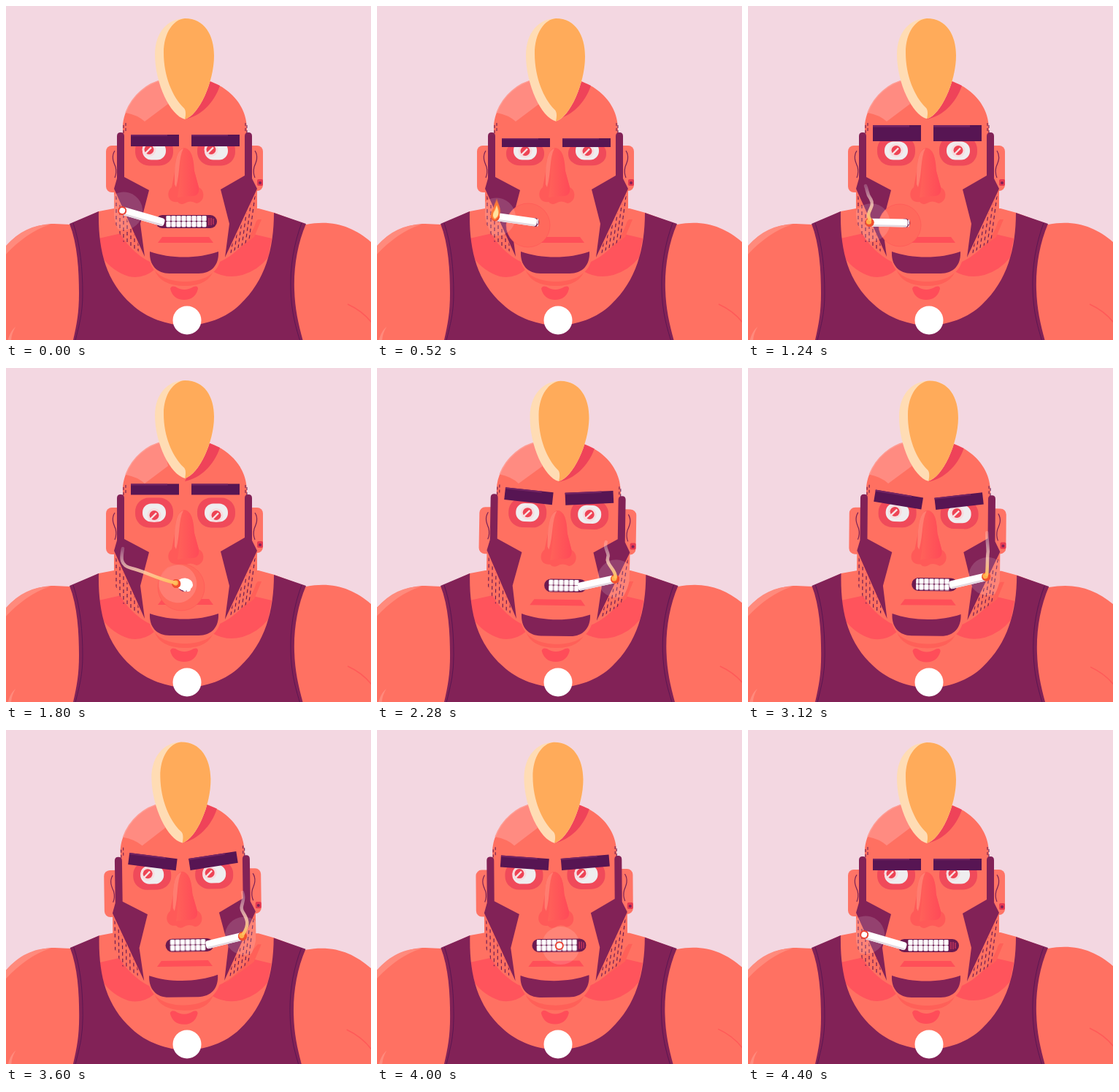
Recreate the animation shown at these times as an HTML page without scripts. Size 500 by 457 pixels, loop 4.44 s.

```html
<!DOCTYPE html>
<html lang="en">
<head>
<meta charset="utf-8">
<title>Tough guy with a cigarette</title>
<style>
@property --tilt { syntax: "<number>"; inherits: true; initial-value: 0 }
@property --drop { syntax: "<number>"; inherits: true; initial-value: 0 }
@property --sway { syntax: "<number>"; inherits: true; initial-value: 0 }
@property --swell { syntax: "<number>"; inherits: true; initial-value: 1 }
@property --slant { syntax: "<number>"; inherits: true; initial-value: 0 }
@property --hair { syntax: "<number>"; inherits: true; initial-value: 1 }
@property --brow-y { syntax: "<number>"; inherits: true; initial-value: 184 }
@property --brow-h { syntax: "<number>"; inherits: true; initial-value: 16 }
@property --brow-a { syntax: "<number>"; inherits: true; initial-value: 0 }
@property --lid { syntax: "<number>"; inherits: true; initial-value: 1 }
@property --look-x { syntax: "<number>"; inherits: true; initial-value: 0 }
@property --look-y { syntax: "<number>"; inherits: true; initial-value: 0 }
@property --mx { syntax: "<number>"; inherits: true; initial-value: 205 }
@property --my { syntax: "<number>"; inherits: true; initial-value: 286 }
@property --mw { syntax: "<number>"; inherits: true; initial-value: 84 }
@property --mh { syntax: "<number>"; inherits: true; initial-value: 18 }
@property --cx { syntax: "<number>"; inherits: true; initial-value: 215 }
@property --cy { syntax: "<number>"; inherits: true; initial-value: 296 }
@property --ca { syntax: "<number>"; inherits: true; initial-value: 16 }
@property --cs { syntax: "<number>"; inherits: true; initial-value: 1 }
@property --cap { syntax: "<number>"; inherits: true; initial-value: 0 }
@property --px { syntax: "<number>"; inherits: true; initial-value: 207 }
@property --pr { syntax: "<number>"; inherits: true; initial-value: 0 }
@property --lit { syntax: "<number>"; inherits: true; initial-value: 0 }
@property --flame { syntax: "<number>"; inherits: true; initial-value: 0 }

html, body { margin: 0; width: 100%; height: 100%; overflow: hidden; background: #f3d7e1 }
svg { display: block; width: 500px; height: 457px; animation: pose 4.44s ease-in-out infinite }

.torso { transform-origin: 90px 440px; transform: rotate(calc(var(--sway) * 1deg)) scaleX(var(--swell)) }
.head { transform-origin: 245px 400px; transform: translateY(calc(var(--drop) * 1px)) rotate(calc(var(--tilt) * 1deg)) }
.hair { transform-origin: 245px 19px; transform: scaleY(var(--hair)) }
.gaze { transform-origin: 235px 190px; transform: rotate(calc(var(--slant) * 1deg)) }
.brow { transform: translate(204px, calc(var(--brow-y) * 1px)) rotate(calc(var(--brow-a) * 1deg)) scaleY(calc(var(--brow-h) / 16)) }
.brow.r { transform: translate(287px, calc(var(--brow-y) * 1px)) rotate(calc(var(--brow-a) * -1deg)) scaleY(calc(var(--brow-h) / 16)) }
.socket { transform: translateY(20px) scaleY(var(--lid)) translateY(-20px) }
.pupil { transform: translate(calc(var(--look-x) * 1px), calc(var(--look-y) * 1px)) }
.mouth { x: calc(var(--mx) * 1px); y: calc(var(--my) * 1px); width: calc(var(--mw) * 1px); height: calc(var(--mh) * 1px); rx: 9px }
.bite { x: calc(var(--mx) * 1px + 6px); y: calc(var(--my) * 1px); width: calc(var(--mw) * 1px - 7px); height: calc(var(--mh) * 1px); rx: 4px }
.teeth { transform: translateY(calc(var(--my) * 1px - 286px)) }
.pucker { cx: calc(var(--px) * 1px); r: calc(var(--pr) * 1px) }
.cig { transform: translate(calc(var(--cx) * 1px), calc(var(--cy) * 1px)) rotate(calc(var(--ca) * 1deg)) }
.roll { transform: scaleX(var(--cs)) }
.tip { transform: translateX(calc(var(--cs) * -58px)) }
.cap { rx: calc(var(--cap) * 1.3px); ry: calc(var(--cap) * 1px) }
.ember { opacity: var(--lit) }
.flame { transform: rotate(calc(var(--ca) * -1deg)) scale(var(--flame)) }
.flicker { animation: flicker .24s ease-in-out infinite alternate }
.smoke { fill: none; stroke: url(#haze); stroke-width: 4.5; stroke-linecap: round; animation: smoke 4.44s ease-in-out infinite, puff 4.44s linear infinite }

@keyframes pose {
  0%, 3%, 97%, 100% {
    --tilt: 0; --drop: 0; --sway: 0; --swell: 1; --slant: 0; --hair: 1;
    --brow-y: 184; --brow-h: 16; --brow-a: 0; --lid: .98; --look-x: -7; --look-y: -1;
    --mx: 205; --my: 286; --mw: 84; --mh: 18; --cx: 215; --cy: 296; --ca: 16; --cs: 1; --cap: 0; --px: 207; --pr: 0; --lit: 0; --flame: 0;
  }
  7% { --lit: 0; --flame: 0 }
  10%, 13% {
    --hair: 1.02; --brow-y: 187; --brow-h: 12; --brow-a: 0; --lid: .8; --look-x: 0; --look-y: 1;
    --mx: 211; --my: 290; --mw: 11; --mh: 12; --cx: 217; --cy: 296; --ca: 8; --cs: .96; --cap: 0; --px: 207; --pr: 30; --lit: 1; --flame: 1;
  }
  19% { --flame: 0 }
  26%, 36% {
    --hair: .995; --brow-y: 174; --brow-h: 22; --brow-a: 0; --lid: 1; --look-x: 0; --look-y: 0;
    --mx: 209; --my: 291; --mw: 13; --mh: 12; --cx: 217; --cy: 297; --ca: 1; --cs: .87; --cap: 0; --px: 208; --pr: 29; --lit: 1; --flame: 0;
  }
  40.5% {
    --hair: .97; --brow-y: 166; --brow-h: 15; --brow-a: 0; --lid: 1; --look-x: 0; --look-y: 4;
    --mx: 236; --my: 290; --mw: 18; --mh: 16; --cx: 246; --cy: 296; --ca: 4; --cs: .22; --cap: 8.5; --px: 240; --pr: 32;
  }
  47% {
    --tilt: 0; --drop: 0; --swell: 1; --slant: 0; --hair: 1; --brow-y: 172; --brow-h: 17; --brow-a: 2; --look-x: 0; --look-y: 1;
    --mx: 227; --my: 288; --mw: 58; --mh: 18; --cx: 275; --cy: 298; --ca: -12; --cs: -.86; --cap: 0; --px: 250; --pr: 0;
  }
  57%, 62% {
    --tilt: 2.4; --drop: 2; --sway: 0; --swell: 1.012; --slant: 2.2; --hair: .985;
    --brow-y: 181; --brow-h: 17; --brow-a: 8; --lid: .98; --look-x: 0; --look-y: 0;
    --mx: 228; --my: 287.5; --mw: 58; --mh: 18; --cx: 276; --cy: 298; --ca: -15; --cs: -.87; --cap: 0; --pr: 0;
  }
  77%, 84% {
    --tilt: -.8; --drop: -.5; --sway: .3; --swell: .996; --slant: 0; --hair: 1;
    --brow-y: 180; --brow-h: 16; --brow-a: 8; --lid: .95; --look-x: -6; --look-y: -1;
    --mx: 220; --my: 286; --mw: 66; --mh: 18; --cx: 277; --cy: 295; --ca: -13; --cs: -.86; --cap: 0; --pr: 0; --lit: 1;
  }
  91% { --lit: 0 }
}
@keyframes smoke {
  0%, 16% { d: path("M163,288 C161,282 166,278 164,274 C162,270 164,266 162,262") }
  22% { d: path("M165,291 C172,281 160,275 166,264 C171,257 160,253 164,244") }
  27.9% { d: path("M167,292 C160,281 175,276 168,264 C162,256 164,252 161,246") }
  36% { d: path("M167,292 C174,281 160,275 166,264 C171,257 160,253 163,244") }
  40.5% { d: path("M232,294 C205,288 190,278 172,274 C155,270 158,258 160,247") }
  47% { d: path("M325,287 C300,290 284,276 262,274 C246,272 244,262 246,250") }
  53% { d: path("M327,286 C332,272 318,268 326,256 C332,250 322,244 326,236") }
  60.4% { d: path("M329,286 C322,273 347,268 335,254 C325,246 337,241 335,234") }
  67% { d: path("M328,285 C336,272 322,264 331,252 C337,242 326,238 330,228") }
  74% { d: path("M326,280 C319,268 334,260 326,250 C318,240 329,232 324,222") }
  81.1% { d: path("M325,279 C334,266 330,258 325,250 C318,240 329,236 324,222") }
  88%, 100% { d: path("M320,276 C314,264 332,256 324,242 C317,232 328,224 323,212") }
}
@keyframes puff {
  0%, 14% { opacity: 0 }
  20%, 84% { opacity: 1 }
  89%, 100% { opacity: 0 }
}
@keyframes flicker { from { transform: skewX(-5deg) } to { transform: skewX(6deg) scaleY(.9) } }
</style>
</head>
<body>
<svg viewBox="0 0 500 457">
  <defs>
    <linearGradient id="haze" x1="0" y1="1" x2="0" y2="0">
      <stop offset="0" stop-color="#ffc060"/>
      <stop offset=".4" stop-color="#ffd3b8" stop-opacity=".8"/>
      <stop offset="1" stop-color="#fff" stop-opacity=".2"/>
    </linearGradient>
    <linearGradient id="bridge">
      <stop offset="0" stop-color="#ff6259"/>
      <stop offset="1" stop-color="#ff4a58"/>
    </linearGradient>
    <pattern id="tooth" x="219" y="287" width="7" height="8" patternUnits="userSpaceOnUse">
      <rect x=".4" width="6.2" height="7.4" rx="1.3" fill="#fff"/>
    </pattern>
    <path id="skull" d="M152,240 L160,182 V168 C160,128 198,97 245,97 C292,97 330,128 330,168 V182 L338,240 L344,252 V288 C340,314 317,339 293,350 C286,371 264,377 245,377 C226,377 204,371 197,350 C175,339 152,314 148,288 V252 Z"/>
    <clipPath id="face"><use href="#skull"/></clipPath>
    <clipPath id="jaw-l"><path d="M149,256 L188,340 L160,322 L149,296 Z"/></clipPath>
    <clipPath id="jaw-r"><path d="M343,256 L302,342 L332,322 L343,296 Z"/></clipPath>
    <clipPath id="bite"><rect class="bite"/></clipPath>
    <g id="eye">
      <rect class="socket" x="-26" y="-20" width="52" height="41" rx="19" fill="#f04a5a"/>
      <rect x="-16" y="-12" width="32" height="25" rx="12" fill="#efedef"/>
      <g class="pupil">
        <circle r="9.5" fill="#f6dde0"/>
        <circle r="6.5" fill="#ee4455"/>
        <path d="M-5,5 L3,-3" stroke="#f9e4e6" stroke-width="2.4"/>
      </g>
    </g>
    <g id="bar">
      <rect x="-33" y="-8" width="66" height="16" fill="#571553"/>
      <rect x="-33" y="-8" width="50" height="2" fill="#742463"/>
    </g>
  </defs>

  <g class="torso">
    <path fill="#ff7162" d="M-10,340 C12,311 40,298 66,298 L88,299 L127,281 L148,277 H346 L368,283 L411,299 C455,291 484,306 512,334 V470 H-10 Z"/>
    <path fill="#ff8a7c" d="M-4,333 C14,310 36,299 60,299 C36,307 16,322 -4,344 Z M2,460 C4,450 8,443 13,439 C9,446 7,452 7,460 Z"/>
    <path fill="none" stroke="#ff5a58" stroke-width="1.5" d="M468,408 Q490,418 503,436"/>
    <path fill="#ff545c" d="M127,318 L158,311 L197,346 L203,361 Q188,374 168,370 Q146,363 132,344 Z M364,318 L334,311 L293,346 L283,363 Q302,374 324,368 Q346,361 359,344 Z"/>
    <path fill="#ff6058" d="M203,360 H285 Q278,383 245,383 Q211,383 203,360 Z M345,292 h5 L340,316 L300,346 Z"/>
    <path fill="#ff4d59" d="M225,387 Q226,382 232,384 Q244,392 257,384 Q263,382 263,387 Q259,402 244,402 Q229,402 225,387 Z"/>
    <path fill="#822257" d="M87,298 L127,281 C126,332 136,376 172,408 C192,427 222,437 247,437 C272,437 302,427 321,408 C355,376 367,332 367,283 L411,298 C399,326 394,358 395,388 C396,420 402,440 410,470 H89 C96,440 100,424 100,393 C100,362 98,326 87,298 Z"/>
    <path fill="none" stroke="#5c1752" d="M92,297 C102,326 105,362 105,393 C105,424 99,440 94,462 M405,297 C394,326 389,358 390,388 C391,420 397,440 404,462"/>
  </g>

  <g class="head">
    <g fill="#ff7466">
      <rect x="137" y="191" width="26" height="64" rx="8"/>
      <rect x="328" y="191" width="24" height="62" rx="8"/>
    </g>
    <path fill="none" stroke="#7a2055" stroke-width="1.2" d="M149,198 C144,206 147,213 150,220 Q152,228 149,235 M341,198 C346,206 343,213 340,220 Q338,228 341,235"/>
    <rect x="344" y="237" width="8" height="9" rx="2" fill="#e53a53"/>
    <circle cx="348" cy="242" r="2" fill="#822257"/>

    <use href="#skull" fill="#ff7061"/>
    <path fill="#ff8b81" d="M164,146 C173,122 194,105 215,101 L222,134 L190,158 Q180,149 164,146 Z"/>
    <path fill="none" stroke="#ff9d94" stroke-width="1.5" d="M164,146 C173,122 194,105 215,101"/>
    <path fill="#ef4359" d="M245,155 C266,151 285,133 293,109 L272,100 Z"/>
    <path fill="none" stroke="#5c1752" stroke-dasharray="4 3" d="M161,163 v12 M164,160 v14 M328,160 v14 M330,163 v12"/>

    <g class="hair">
      <path fill="#ffdcb4" d="M204,66 C204,36 222,17 245,17 C272,17 285,40 285,68 C285,104 264,150 245,155 C225,150 204,106 204,66 Z"/>
      <path fill="#ffab5a" d="M216,64 C216,36 230,18 245,17 C272,17 285,40 285,68 C285,104 264,150 245,155 C247,147 246,141 243,139 C228,124 216,96 216,64 Z"/>
    </g>

    <path fill="#822257" d="M152,178 q0,-5 5,-5 t5,5 V234 L196,252 L184,298 L190,343 L148,250 L152,236 Z M337,178 q0,-5 -5,-5 t-5,5 V232 L294,251 L306,298 L300,344 L344,250 L337,236 Z"/>
    <g fill="none" stroke="#6c1d53" stroke-width="1.2" stroke-dasharray="5 4">
      <path clip-path="url(#jaw-l)" d="M151,260 v60 M156,263 v70 M161,258 v70 M166,264 v70 M171,260 v80 M176,264 v80 M181,260 v80"/>
      <path clip-path="url(#jaw-r)" d="M341,260 l-8,60 M337,258 l-10,75 M332,262 l-10,75 M327,264 l-10,75 M322,268 l-10,75 M317,280 l-10,65"/>
    </g>

    <g class="gaze">
      <use href="#eye" x="203" y="197.5"/>
      <use href="#eye" x="288" y="197.5"/>
      <g class="brow"><use href="#bar"/></g>
      <g class="brow r"><use href="#bar"/></g>
    </g>

    <path fill="#ff5a58" d="M232,222 C232,185 257,185 257,222 L264,248 C273,252 273,268 261,270 Q252,265 245,270 Q239,273 235,268 C221,270 219,254 227,248 Z"/>
    <path fill="url(#bridge)" d="M238,205 Q243,190 252,199 Q257,206 258,226 L264,248 Q266,262 250,260 L235,262 Q240,232 238,205 Z"/>
    <path fill="#ff7d70" d="M231,244 C231,218 232,198 243,195 C236,208 239,226 233,248 Z"/>

    <path fill="#ff4f58" d="M214,316 H278 L284,324 H208 Z"/>
    <path fill="#822257" d="M197,336 C225,346 263,346 291,336 C292,355 281,366 264,366 H224 C207,366 196,355 197,336 Z"/>

    <circle class="pucker" cy="300" fill="#ff695c" stroke="#ff5557" stroke-opacity=".55"/>
    <g clip-path="url(#face)">
      <g class="cig"><g class="tip"><circle cx="2" r="26" fill="#fff" opacity=".14"/></g></g>
    </g>

    <rect class="mouth" fill="#6c1a50"/>
    <g clip-path="url(#bite)">
      <g class="teeth">
        <rect x="219" y="287" width="56" height="16" fill="url(#tooth)"/>
        <path stroke="#c2335a" stroke-width="1.5" d="M278,290 v10 M281,290 v10 M284,291 v8"/>
      </g>
    </g>

    <g class="cig">
      <g class="roll">
        <rect x="-58" y="-5.5" width="60" height="11" rx="4" fill="#fff"/>
        <path d="M-56,4.2 H0" stroke="#e3d8df" stroke-width="2.5"/>
      </g>
      <ellipse class="cap" cx="-1" fill="#fff"/>
      <g class="tip">
        <circle r="5" fill="#fff" stroke="#ea4335" stroke-width="2"/>
        <g class="ember">
          <circle r="6" fill="#f0502f"/>
          <circle cx="-1" cy="-1" r="3.6" fill="#ffb04a"/>
        </g>
        <g class="flame">
          <g class="flicker">
            <path fill="#ff7a35" d="M0,5 C-9,2 -6,-8 -3,-12 C-3,-17 0,-20 0,-25 C4,-15 9,-9 5,0 Z"/>
            <path fill="#ffe3a0" d="M0,3 C-5,0 -3,-6 -1,-9 L1,-16 C3,-10 6,-5 3,0 Z"/>
          </g>
        </g>
      </g>
    </g>
  </g>

  <path class="smoke" d="M163,288 C161,282 166,278 164,274 C162,270 164,266 162,262"/>
  <circle cx="248" cy="430" r="19.5" fill="#fff"/>
</svg>
</body>
</html>
```
